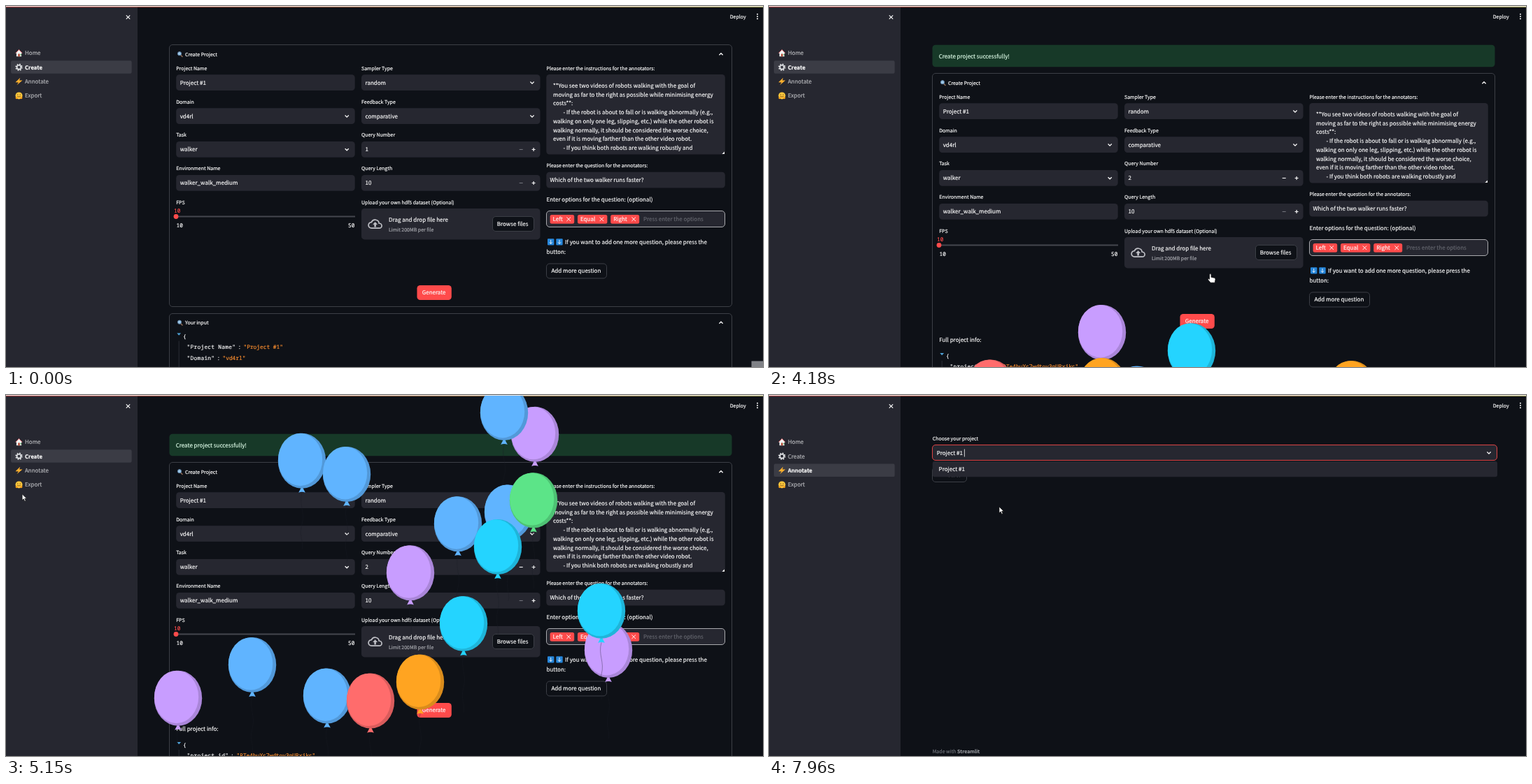
Recreate the animation shown at these times as an HTML page. Size 1082 by 517 pixels, loop 8 s.

```html
<!DOCTYPE html>
<html lang="en">
<head>
<meta charset="utf-8">
<title>Create project</title>
<style>
html, body { margin: 0; width: 100%; height: 100%; overflow: hidden; background: #0e1117; }
svg { display: block; width: 100%; height: 100%; }
text { font-family: "Noto Sans CJK SC", "Noto Sans CJK JP", "Noto Sans", sans-serif; font-weight: 500; text-rendering: geometricPrecision; white-space: pre; }
.mono { font-family: "Noto Sans Mono", "DejaVu Sans Mono", monospace; }
</style>
</head>
<body>
<svg id="stage" viewBox="0 0 1082 517"></svg>
<script>
const LOOP = 8000, TICK = 69.1, TICK_ORIGIN = 3420;
const WHITE = '#fafafa', FIELD = '#262730', RED = '#ff4b4b', EDGE = '#3c3f46', BG = '#0e1117';

// Markup helpers; cy is the optical middle of a line of text.
const text = (x, cy, str, { size = 8, fill = WHITE, more = '' } = {}) =>
  `<text x="${x}" y="${cy + size * 0.37}" font-size="${size}" fill="${fill}" stroke="${fill}" stroke-width=".18" ${more}>${str}</text>`;
const small = (x, cy, str, fill = WHITE) => text(x, cy, str, { size: 7, fill });
const mono = (x, cy, str, fill = WHITE, spacing = 0) =>
  text(x, cy, str, { size: 7.84, fill, more: `class="mono" letter-spacing="${spacing}"` });
const box = (x, y, w, h, fill = FIELD, more = '', r = 4.5) =>
  `<rect x="${x}" y="${y}" width="${w}" height="${h}" rx="${r}" fill="${fill}" ${more}/>`;
const line = (d, stroke = WHITE, width = 1.2, more = '') =>
  `<path d="${d}" fill="none" stroke="${stroke}" stroke-width="${width}" ${more}/>`;
const shape = (d, fill, more = '') => `<path d="${d}" fill="${fill}" ${more}/>`;
const group = (body, more = '') => `<g ${more}>${body}</g>`;
const at = (x, y, body, scale = 1) => group(body, `transform="translate(${x} ${y}) scale(${scale})"`);
const span = (from, to, body) => group(body, `data-from="${from}" data-to="${to}"`);

const chevron = (x, y, dir = 1) =>
  line(`M${x - 2.6} ${y - 1.3 * dir}l2.6 ${2.6 * dir} 2.6 ${-2.6 * dir}`, WHITE, 1.3);
const cross = (x, y, r, w = 1) => line(`M${x - r} ${y - r}l${2 * r} ${2 * r}m0 ${-2 * r}l${-2 * r} ${2 * r}`, WHITE, w);
const outline = `stroke="${EDGE}"`;
const button = (x, y, w, h, label) => box(x, y, w, h, BG, outline) + text(x + 7, y + h / 2, label);
const magnifier = (x, y) =>
  line(`M${x + 1.5} ${y + 1}l3 3`, '#8d6a55', 1.5) +
  `<circle cx="${x}" cy="${y - 0.8}" r="2.6" fill="#9fc9e8" stroke="#5b7fa3"/>`;

const field = (x, label, cy, value, select) =>
  small(x, cy - 20.7, label) + box(x, cy - 11.5, 255.5, 22.8) + text(x + 5.5, cy, value) +
  (select ? chevron(x + 244, cy) : '');
const minus = (cy, fill) => line(`M733.7 ${cy}h5`, fill, 1.1);
const plus = cy => line(`M751.6 ${cy}h5M754.1 ${cy - 2.5}v5`, WHITE, 1.2);
const tag = (x, w, label) =>
  box(x, 299, w, 12.7, RED, '', 2.5) + text(x + 4, 305.3, label) + cross(x + w - 8, 305.3, 2.8);
const downArrow = x => box(x, 333.2, 9.4, 9.4, '#2686da', '', 1) +
  line(`M${x + 4.7} 335v5.4m-2 -2l2 2.2 2 -2.2`, WHITE, 0.9);

const instructions = [
  '**You see two videos of robots walking with the goal of',
  'moving as far to the right as possible while minimising energy', 'costs**:',
  '> - If the robot is about to fall or is walking abnormally (e.g.,',
  'walking on only one leg, slipping, etc.) while the other robot is',
  'walking normally, it should be considered the worse choice,',
  'even if it is moving farther than the other video robot.',
  '> - If you think both robots are walking robustly and'
].map((s, i) => text(s[0] === '>' ? 796.5 : 782, 114 + i * 12.75, s.replace('> ', ''))).join('');

const cloud = at(517.3, 301.8,
  line('M19 19H6a5 5 0 0 1-.1-10 6.6 6.6 0 0 1 12.6 2H19a4 4 0 0 1 0 8z', '#bfc0c6', 2) +
  shape('M10.5 17v-4H8l4-4.2 4 4.2h-2.5v4z', '#bfc0c6'), 0.86);

const jsonRow = (cy, key, colon, valueX, value) =>
  mono(258.5, cy, `"${key}"`, WHITE, 0.28) + mono(colon, cy, ':') + mono(valueX, cy, `"${value}"`, '#fd8f2f');
const jsonOpen = cy => shape(`M244.3 ${cy - 4}h5.8l-2.9 3.2z`, '#4fa3d8') + mono(253, cy, '{') +
  line(`M247.2 ${cy + 7}V560`, '#33363d', 0.8);

const form =
  magnifier(248, 69) + small(256, 69, 'Create Project') + chevron(1022, 69, -1) +
  field(243.2, 'Project Name', 109.8, 'Project #1') +
  field(243.2, 'Domain', 157.8, 'vd4rl', true) +
  field(243.2, 'Task', 205.5, 'walker', true) +
  field(243.2, 'Environment Name', 253.5, 'walker_walk_medium') +
  small(243.2, 281, 'FPS') +
  line('M243 301.5H499', '#45474f', 2) + `<circle cx="243" cy="301.5" r="3.4" fill="${RED}"/>` +
  group(mono(240, 293, '10', RED), 'id="sliderLabel"') + mono(243.5, 314.3, '10') + mono(489, 314.3, '50') +
  field(508, 'Sampler Type', 109.8, 'random', true) +
  field(508, 'Feedback Type', 157.8, 'comparative', true) +
  field(508, 'Query Number', 205.5, '') + field(508, 'Query Length', 253.5, '10') +
  span(0, 1150, text(513.5, 205.5, '1') + minus(205.5, '#72747b')) +
  span(1150, LOOP, text(513.5, 205.5, '2') + minus(205.5, WHITE)) +
  span(740, 2300, shape('M745 194.2h14.2a4.5 4.5 0 0 1 4.5 4.5v13.6a4.5 4.5 0 0 1-4.5 4.5H745z', RED)) +
  span(2300, 2700, box(508.5, 194.5, 255, 22, 'none', `stroke="${RED}"`)) +
  plus(205.5) + minus(253.5, '#72747b') + plus(253.5) +
  small(508, 281, 'Upload your own hdf5 dataset (Optional)') + box(508, 290, 255.5, 44.4) + cloud +
  text(547, 306.3, 'Drag and drop file here') + small(547, 320.8, 'Limit 200MB per file', '#a5a6ac') +
  box(695.5, 301.5, 59, 21, BG, outline) + text(701.7, 312.3, 'Browse files') +
  small(772.5, 89, 'Please enter the instructions for the annotators:') +
  box(772.3, 98, 255.5, 114.5) + instructions + shape('M1027 208.5v3.6h-3.6z', WHITE) +
  small(772.5, 228.6, 'Please enter the question for the annotators:') +
  box(772.3, 237.7, 255.5, 22.8) + text(777.5, 249, 'Which of the two walker runs faster?') +
  text(772.5, 277, 'Enter options for the question: (optional)') +
  box(772.5, 293.5, 255, 23, FIELD, 'stroke="#a9aaae"') +
  tag(777.6, 34.6, 'Left') + tag(817, 42.4, 'Equal') + tag(864.2, 41, 'Right') +
  text(911, 305.3, 'Press enter the options', { fill: '#63656d' }) +
  downArrow(774) + downArrow(786.3) +
  text(799, 337.7, 'If you want to add one more question, please press the') + text(772.5, 352.2, 'button:') +
  button(772.5, 369, 86, 21, 'Add more question') +
  box(587.5, 400, 49.3, 21, RED) + span(3200, 3920, box(587.5, 400, 49.3, 21, '#ff3333')) +
  text(594.7, 410.3, 'Generate');

const SUCCESS = 3930, LEAVE = 5980;
const createPage = span(0, LEAVE,
  span(0, SUCCESS,
    box(233.5, 55.5, 804, 375, 'none', outline) + box(233.5, 440.5, 804, 120, 'none', outline) +
    magnifier(248, 453.5) + small(256, 453.8, 'Your input') + chevron(1022, 453.5, -1) + jsonOpen(472.6) +
    jsonRow(488, 'Project Name', 331.5, 339.5, 'Project #1') + jsonRow(503.8, 'Domain', 301.5, 309.5, 'vd4rl')) +
  span(SUCCESS, LEAVE,
    box(233.5, 55.7, 804, 31.5, '#173928') + text(242.7, 71.8, 'Create project successfully!', { fill: '#dffde9' }) +
    box(233.5, 96.5, 804, 460, 'none', outline) + text(243.2, 478, 'Full project info:') + jsonOpen(501) +
    jsonRow(515.8, 'project_id', 321, 329.5, 'RTe4buYc7wdtov3nURxjkc')) +
  group(form, 'id="form"'));

const caret = line('M279.4 77.5v11', WHITE, 0.8);
const annotatePage = span(LEAVE, LOOP,
  small(233.7, 62.5, 'Choose your project') + button(233.5, 103.5, 49, 21, 'Annotate') +
  box(233.5, 71.5, 807, 22, FIELD) + text(239.7, 83, 'Project #1') + chevron(1029, 82.8) +
  span(6870, LOOP, box(233.5, 71.5, 807, 22, 'none', `stroke="${RED}" stroke-opacity=".85"`) +
    box(233.8, 95, 807.2, 22.3, FIELD, '', 3) + text(242.6, 106, 'Project #1')) +
  span(6870, 7420, caret) + span(7690, LOOP, caret) +
  small(233.7, 510.3, 'Made with <tspan font-weight="700" fill="#a3a5a9">Streamlit</tspan>', '#6d7077'));

// Sidebar
const icons = [
  shape('M-4.5 0L0-5 4.5 0 3.6 .8V5h-7.2V.8z', '#f1f3f2') + line('M-4.8 .2L0-4.8 4.8 .2', '#c9545a', 1) +
    shape('M-1.2 5V1.2h2.4V5z', '#b5462f') + shape('M2 1.5h1.4v2H2z', '#5aa35a'),
  `<circle r="4.3" fill="none" stroke="#e4e6e8" stroke-width="1.8" stroke-dasharray="1.8 1.58"/>
   <circle r="2.9" fill="none" stroke="#e4e6e8" stroke-width="1.6"/>`,
  shape('M1.8-5.2L-5 1.2-.6 1.4-3 5.2 5-1.4 .6-1.5z', '#ffb02e'),
  `<circle r="5" fill="#ffc83d"/>` + line('M-2.6-1.2q.8-1 1.6 0m2 0q.8-1 1.6 0M-2.3 .6q2.3 2.6 4.6 0', '#6b4514', 0.9) +
    `<circle cx="-3.2" cy="3.2" r="1.7" fill="#f59f1d"/><circle cx="3.2" cy="3.2" r="1.7" fill="#f59f1d"/>`
];
const navY = [67.3, 87.7, 108, 128.4];
const navRow = y => box(7, y - 9.5, 172.7, 18.6, '#3b3c45', '', 2.2);
const navText = (i, label, from, to) =>
  span(0, from, text(27, navY[i], label, { fill: '#b5b6ba' })) +
  span(to, LOOP, text(27, navY[i], label, { fill: '#b5b6ba' })) +
  span(from, to, text(27, navY[i], label, { size: 7.8, more: 'font-weight="700" style="font-weight:700"' }));
const sidebar = box(0, 0, 188, 517, FIELD, '', 0) + cross(174.5, 16, 2.7, 1.2) +
  span(0, LEAVE, navRow(navY[1])) + span(5440, LOOP, navRow(navY[2])) +
  icons.map((icon, i) => at(18.5, navY[i], icon)).join('') +
  navText(0, 'Home', LOOP, LOOP) + navText(1, 'Create', 0, LEAVE) +
  navText(2, 'Annotate', LEAVE, LOOP) + navText(3, 'Export', LOOP, LOOP);

const topBar = small(1034.8, 15, 'Deploy') +
  [11.7, 15, 18.3].map(y => `<circle cx="1074" cy="${y}" r="1" fill="${WHITE}"/>`).join('') +
  `<linearGradient id="warm"><stop stop-color="${RED}"/><stop offset="1" stop-color="#fffd80"/></linearGradient>` +
  box(0, 0, 1082, 1, '#ece8e4', '', 0) + box(0, 1, 1082, 1, 'url(#warm)', 'opacity=".6"', 0);

// Balloons: horizontal middle, launch time, colour; listed from back to front.
const HUES = { p: '#c89dff', c: '#24d4ff', r: '#ff6c6c', o: '#ffa421', b: '#60b4ff', g: '#5ce488' };
const balloons = [
  [476, 3954, 'p'], [604, 3994, 'c'], [477, 4099, 'o'], [317, 4107, 'r'], [833, 4113, 'o'],
  [480, 4184, 'p'], [527, 4151, 'b'], [219, 4199, 'o'], [266, 4276, 'p'], [604, 4285, 'b'],
  [675, 4397, 'o'], [756, 4527, 'p'], [712, 4504, 'b'], [423, 4556, 'b'], [487, 4571, 'b'],
  [718, 4615, 'b'], [754, 4601, 'g'], [646, 4629, 'b'], [703, 4657, 'c'], [578, 4690, 'p'],
  [861, 4798, 'p'], [851, 4741, 'c'], [654, 4759, 'c'], [352, 4821, 'b'], [459, 4873, 'b'],
  [246, 4877, 'p'], [521, 4882, 'r'], [592, 4849, 'o']
];
const balloon = hue => line('M0 45c-5 18 5 28 0 46s3 24 0 36', '#1b1d26', 0.7, 'opacity=".5"') +
  shape('M-1.2 38.5h2.4L4.8 45.6q-4.8-2-9.6 0z', hue) +
  `<ellipse rx="34.2" ry="39.5" fill="${hue}"/><ellipse rx="34.2" ry="39.5" opacity=".15"/>
   <ellipse cx="-2.4" cy="-1.7" rx="31.6" ry="37.7" fill="${hue}"/>`;

// Cursor: times with the place of its tip, and the shape it takes from a time on.
const path = [
  [70, 1075, 510], [400, 900, 330], [810, 760.5, 205], [1420, 760.5, 205], [1690, 667.5, 205.5],
  [2590, 667.5, 205.5], [3210, 616, 408], [3900, 616, 408], [4400, 642.5, 365], [4650, 642.5, 365],
  [5010, 330, 250], [5080, 110, 165], [5140, 23, 142], [5300, 25, 138], [5560, 59.5, 109],
  [6000, 59.5, 109], [6500, 300, 84], [6900, 300, 86], [7420, 300, 103], [7760, 317, 142], [7900, 329, 160]
];
const looks = [[0, 'none'], [70, 'arrow'], [690, 'hand'], [1500, 'beam'], [2650, 'arrow'], [3150, 'hand'],
  [4700, 'arrow'], [5440, 'hand'], [6080, 'arrow'], [6450, 'hand'], [7500, 'arrow']];
const ink = 'stroke="#111" stroke-width=".7" stroke-linejoin="round"';
const cursors = {
  arrow: shape('M0 0V9L2.1 7 3.6 10.4 5.2 9.7 3.7 6.5H6.5Z', '#fff', ink),
  hand: shape('M-1.2 .9a1.2 1.2 0 0 1 2.4 0V4.5l4.4 .9q1.7 .5 1.6 2.1l-.8 4.8h-6.2l-3.5-4.3q-.6-1.3 .8-1.4l1.3 .9z', '#fff', ink),
  beam: line('M-2.5-5H2.5M0-5V5M-2.5 5H2.5', '#fff', 0.9)
};

const stage = document.getElementById('stage');
stage.innerHTML = box(0, 0, 1082, 517, BG, '', 0) + createPage + annotatePage + sidebar + topBar +
  span(0, 70, box(1065.5, 508.5, 17, 9, '#808287', '', 0)) +
  '<clipPath id="below"><rect y="1" width="1082" height="516"/></clipPath>' +
  group(balloons.map(b => group(balloon(HUES[b[2]]), 'class="balloon"')).join(''), 'clip-path="url(#below)"') +
  group(Object.entries(cursors).map(([name, art]) => group(art, `data-look="${name}"`)).join(''), 'id="cursor"');

const find = id => document.getElementById(id);
const spans = [...stage.querySelectorAll('[data-from]')];
const flying = [...stage.querySelectorAll('.balloon')];
const pointers = [...stage.querySelectorAll('[data-look]')];
const formEl = find('form'), sliderLabel = find('sliderLabel'), cursor = find('cursor');
const show = (el, on) => { el.style.display = on ? '' : 'none'; };
const move = (el, x, y) => el.setAttribute('transform', `translate(${x} ${y})`);

// cubic-bezier(.42, 0, 1, 1), solved by bisection
function easeIn(x) {
  let lo = 0, hi = 1;
  for (let i = 0; i < 20; i++) {
    const s = (lo + hi) / 2;
    if (1.26 * s * (1 - s) ** 2 + 3 * s * s * (1 - s) + s ** 3 < x) lo = s; else hi = s;
  }
  return lo * lo * (3 - 2 * lo);
}

function cursorAt(t) {
  const next = path.findIndex(p => p[0] > t);
  if (next <= 0) return path[next ? path.length - 1 : 0].slice(1);
  const [t0, x0, y0] = path[next - 1], [t1, x1, y1] = path[next];
  const k = (t - t0) / (t1 - t0);
  return [x0 + (x1 - x0) * k, y0 + (y1 - y0) * k];
}

function render(t) {
  const held = Math.max(0, TICK_ORIGIN + TICK * Math.floor((t - TICK_ORIGIN) / TICK + 0.05));
  spans.forEach(el => show(el, t >= +el.dataset.from && t < +el.dataset.to));
  move(formEl, 0, t >= SUCCESS ? 41 : 0);
  const stale = (t - 1080) / 610;
  sliderLabel.style.opacity = stale > 0 && stale < 1 ? 1 - 0.55 * Math.sin(Math.PI * stale) : 1;

  balloons.forEach(([x, start], i) => {
    const k = (held - start) / 750;
    show(flying[i], k > 0 && k < 1);
    if (k > 0 && k < 1) move(flying[i], x, 557 - 685 * easeIn(k));
  });

  const look = looks.filter(l => l[0] <= t).pop()[1];
  pointers.forEach(el => show(el, el.dataset.look === look));
  move(cursor, ...cursorAt(held));
}

const began = performance.now();
function frame() {
  render((performance.now() - began) % LOOP);
  requestAnimationFrame(frame);
}
frame();
</script>
</body>
</html>
```
